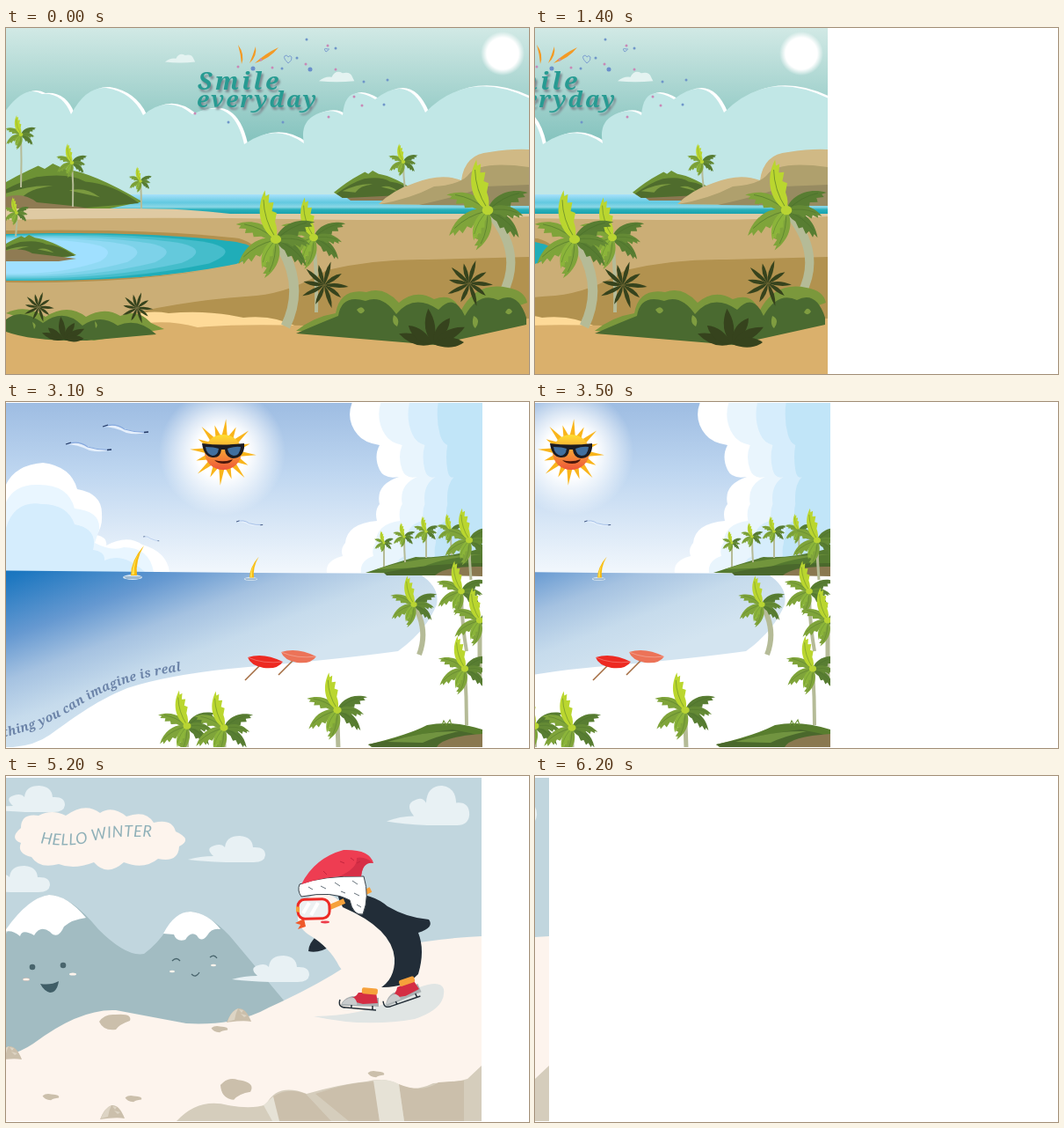
These frames come from a looping animation (595x393 px, 6300 ms). An HTML page:

```html
<!DOCTYPE html>
<html lang="en">
<head>
<meta charset="utf-8">
<title>Three postcards</title>
<style>
html, body { margin: 0; width: 100%; height: 100%; overflow: hidden; background: #fff; }
#stage { display: block; width: 595px; height: 393px; }
.script { font: italic 800 28px "Noto Serif", serif; }
.title { fill: #279b92; filter: drop-shadow(2px 3px 1px #7d8a90); }
</style>
</head>
<body>
<svg id="stage" viewBox="0 0 595 393"></svg>
<script>
const path = (fill, d, extra = '') => `<path fill="${fill}" d="${d}" ${extra}/>`;
const line = (color, width, d, extra = '') =>
  `<path fill="none" stroke="${color}" stroke-width="${width}" d="${d}" ${extra}/>`;
const place = (x, y, s, body, turn = 0) =>
  `<g transform="translate(${x} ${y}) rotate(${turn}) scale(${s})">${body}</g>`;
const ellipse = (fill, x, y, rx, ry = rx, extra = '') =>
  `<ellipse fill="${fill}" cx="${x}" cy="${y}" rx="${rx}" ry="${ry}" ${extra}/>`;
const rect = (fill, x, y, w, h, extra = '') =>
  `<rect fill="${fill}" x="${x}" y="${y}" width="${w}" height="${h}" ${extra}/>`;
const stops = list => list.map(([at, color, alpha = 1]) =>
  `<stop offset="${at}" stop-color="${color}" stop-opacity="${alpha}"/>`).join('');
const linear = (id, list, x2 = 0, y2 = 1) =>
  `<linearGradient id="${id}" x2="${x2}" y2="${y2}">${stops(list)}</linearGradient>`;
const radial = (id, list) => `<radialGradient id="${id}">${stops(list)}</radialGradient>`;

// Palms: drooping leaves around a crown, trunk from crown to foot
const leaf = (color, turn, flip, size) =>
  `<g transform="scale(${flip} 1) rotate(${turn}) scale(${size})">` +
  path(color, 'M0 0C9-11 32-14 50 3L44 2 45 6 37 3 36 8 28 4 25 8 17 4Q7 5 0 0') +
  line('#456b28', .8, 'M2 0Q22-6 41-1', 'opacity=".6"') + '</g>';
const crown = [
  ['#587d32', -27, 1, .95], ['#587d32', 38, 1, .9], ['#648a35', 6, 1, .78],
  ['#7fa43a', 103, 1, .9], ['#7fa43a', 30, -1, 1], ['#8bb43a', 62, -1, .72],
  ['#7fa43a', -24, -1, .95], ['#bad62f', -106, 1, 1.12]
].map(l => leaf(...l)).join('') + ellipse('#b8d432', 0, 0, 6, 5);
const palm = (x, y, s, dx, dy, bend = 0, width = 2) =>
  line('#b5bb97', width, `M${x} ${y}q${bend} ${dy / 2} ${dx} ${dy}`) + place(x, y, s, crown);

const fan = (x, y, s, angles, width) => place(x, y, s, angles.map((a, i) =>
  path('#36431d', `M0 0Q14-${width} ${i % 2 ? 25 : 29} 2Q14 ${width} 0 0`, `transform="rotate(${a})"`)).join(''));
const burst = [0, 32, 68, 110, 150, 185, 218, 250, 282, 322];
const agave = [-167, -148, -102, -62, -32, -8];

const island = (x, y, w, h) => `<g transform="translate(${x} ${y}) scale(${w} ${h})">` +
  path('#6d9235', 'M0 .8Q.15.4.3.15L.36.05.4.12.45 0 .52.12Q.7.2 1 .85L.8 1H.1Z') +
  path('#4f6c2d', 'M.03.85Q.2.45.35.3Q.55.2.65.4Q.82.45.98.88L.6 1H.1Z') +
  path('#7b9a3f', 'M.1.75Q.3.45.45.5Q.3.55.25.8ZM.55.6Q.65.5.74.75Z') + '</g>';

function tropics() {
  const cloud = 'M0 98Q24 62 45 74Q68 72 78 97Q95 65 118 67Q148 72 160 98Q188 74 216 97Q262 74 275 131Q310 106 343 130Q338 106 357 97Q375 89 387 98Q390 60 424 80Q462 50 481 95Q530 45 600 79V195H0Z';
  const puff = 'M0 10Q6 5 13 6Q17-2 24 2Q32 0 34 6L36 10Q18 12 0 10Z';
  const lagoon = 'M0-24C90-27 200-24 262-15Q304-6 262 10Q150 32 0 30Z';
  const water = ['#20adb8', '#45bdcb', '#64c9dc', '#7dd2e9', '#91daf4', '#a0e0ff'];
  const dots = (color, width, spots) => line(color, width,
    spots.map(([x, y]) => `M${x} ${y}h.01`).join(''), 'stroke-linecap="round"');
  return rect('url(#teal)', 0, 0, 595, 200) +
    ellipse('url(#moon)', 565, 29, 25) +
    place(181, 29, .95, path('#e4f3f1', puff)) +
    place(356, 49, 1.12, path('#e4f3f1', puff)) +
    path('#fff', cloud) + path('#c1e7e6', cloud, 'transform="translate(-4 1)"') +
    rect('#c1e7e6', 590, 82, 5, 110) + rect('url(#shore)', 0, 189, 595, 23) +
    // islands and rocks on the horizon
    island(-30, 154, 185, 51) +
    path('#8f7b53', 'M0 192Q20 186 35 198L75 202 128 210H0Z') +
    island(373, 162, 98, 31) + path('#8a7750', 'M388 193L448 190 460 196H392Z') +
    palm(452, 152, .38, 2, 32) +
    path('#d0b985', 'M424 200Q440 184 465 176Q495 164 518 173Q522 143 550 141Q575 137 595 138V202Z') +
    path('#afa06d', 'M425 200Q460 194 487 180Q515 178 525 168Q537 150 595 158V202Z') +
    path('#978b61', 'M470 201Q520 190 545 180L595 178V202Z') +
    // sand and lagoon
    path('#dfcaa3', 'M0 205L128 205Q200 204 255 211H595V230H0Z') +
    path('#cbae76', 'M0 218Q150 214 320 217T595 214V393H0Z') +
    path('#b2914f', 'M0 230Q160 227 265 239Q285 245 280 252L0 240Z') +
    water.map((c, i) => {
      const k = 1 - i * .118;
      return path(c, lagoon, `transform="translate(0 258) scale(${k} ${.5 + k / 2})"`);
    }).join('') +
    path('#b2914f', 'M0 289Q150 291 262 269Q170 288 0 287Z') +
    path('#b2924f', 'M100 336Q180 311 285 304Q325 300 365 275Q420 262 480 263L595 260V350H100Z') +
    path('#feda98', 'M118 338Q150 318 185 324Q230 320 270 329Q305 325 335 341L200 345Z') +
    path('#dab06c', 'M0 338Q90 345 160 335Q190 332 218 340Q260 336 340 338L595 330V393H0Z') +
    island(-18, 235, 98, 27) + path('#8f7b53', 'M0 253Q18 249 30 256L80 262 60 265H0Z') +
    palm(17, 121, .4, 0, 60, 1) + palm(75, 153, .4, 1, 50, 2) +
    palm(153, 174, .3, 1, 31, 1) + palm(12, 210, .33, -1, 27, 1) +
    // foreground plants
    palm(350, 238, .83, 3, 85, 4, 4) + palm(307, 240, 1.02, 11, 99, 35, 11) +
    palm(548, 207, 1.05, 17, 95, 42, 10) +
    path('#7b983c', 'M0 324Q22 313 45 328Q70 312 91 328Q112 316 130 327Q150 318 165 335L180 342 100 355Z') +
    path('#4a6a30', 'M0 331Q17 317 42 335Q66 317 87 338Q107 324 127 338Q150 328 171 348L92 355Q30 356 0 345Z') +
    path('#7b983c', 'M330 344Q350 328 375 324Q380 295 410 300Q430 293 447 312Q466 296 487 308Q510 300 517 322Q535 287 571 295Q590 298 593 312L480 352Z') +
    path('#4a6a30', 'M330 347Q360 334 378 327Q382 302 409 310Q428 302 444 325Q464 301 492 320Q510 300 522 327Q538 299 560 309Q582 298 592 329V337L488 360Z') +
    path('#7f9d40', 'M399 320q6-6 9 1q-4 7-9-1M441 326q8 4 4 13q-7-3-4-13M532 327q9 4 2 14q-5-4-2-14M568 323q4-8 8-1q-3 6-8 1M30 334q6 3 2 8zM101 333q5 4 1 8z') +
    fan(66, 354, .9, agave, 8) + fan(486, 359, 1.4, agave, 8) +
    fan(362, 292, .95, burst, 5) + fan(527, 290, .93, burst, 5) +
    fan(37, 317, .61, burst, 5) + fan(149, 318, .63, burst, 5) +
    // greeting
    path('#f39a25', 'M264 19Q272 30 268 41Q267 29 264 19M284 21Q286 32 277 40Q281 31 284 21M310 22Q300 35 283 40Q295 29 310 22') +
    line('#7d9fd0', 1, 'M321 40q-8-8-2-9q2 1 2 2q2-3 4 0q1 4-4 7M364 27q-4-5 2-3q4-1-2 3') +
    dots('#6f96c9', 3, [[342, 13], [331, 34], [375, 23], [407, 61], [434, 59], [253, 107], [315, 107], [314, 46], [430, 87]]) +
    dots('#6a8fcb', 5, [[346, 47], [281, 46]]) +
    dots('#c889b6', 3, [[366, 20], [341, 41], [375, 47], [396, 78], [405, 88], [367, 101], [215, 97], [290, 36], [264, 44], [303, 45]]) +
    '<g class="script title"><text x="218" y="70" letter-spacing="3.4">Smile</text>' +
    '<text x="217" y="90" letter-spacing="2" style="font-size:26px">everyday</text></g>';
}

function seaside() {
  const gull = path('#e6f0fc', 'M0 0Q10-5 24 2Q38 7 52 6Q40 10 27 7Q13 0 0 0') +
    line('#86a9de', 1.1, 'M1 0Q14-5 25 3Q38 7 52 6') +
    line('#263b65', 1.3, 'M0 0l6-2M47 6.5l5-.5');
  const boat = ellipse('#d8e7f3', -5, 17, 11, 3) + path('#9db9d0', 'M-15 16H6L2 19H-12Z') +
    path('#f7ba10', 'M8-19Q-7-2-7 15H0Q-2-2 8-19') + path('#ffe04a', 'M5-14Q-5-1-6 14H-3Q-4-2 5-14');
  const parasol = color => line('#a46d42', 1.6, 'M4-2L-21 23') +
    path(color, 'M-18-3Q0-9 22 2Q16 11 0 9Q-15 6-18-3') + line('#fff', .7, 'M-18-3Q0 5 22 2', 'opacity=".4"');
  const rays = Array.from({ length: 16 }, (_, i) =>
    path('#f9b51c', `M-3-19L0-${i % 2 ? 32 : 38} 3-19Z`, `transform="rotate(${i * 22.5 + 5})"`)).join('');
  const sun = rays + ellipse('url(#face)', 0, 0, 21, 20) +
    path('#1c1c22', 'M-24-10Q0-7 24-10V-5Q22 7 11 7Q3 6 2-3H-2Q-3 7-12 6Q-22 5-24-10') +
    path('#416f9f', 'M-20-6Q-10-6-5-4Q-6 4-12 4Q-19 2-20-6M5-4Q13-7 20-6Q19 4 12 4Q6 3 5-4') +
    path('#4b170b', 'M-10 9Q1 12 11 8Q9 13 1 13Q-6 13-10 9');
  const bank = 'M446 0Q438 20 452 37Q459 46 477 49Q470 62 477 77Q482 88 499 85Q472 94 477 116Q471 123 474 135Q440 138 438 160Q432 167 435 175Q415 180 417 194H594V0Z';
  return rect('url(#azure)', 0, 0, 595, 200) +
    ellipse('url(#glow)', 298, 57, 72) +
    path('#fff', 'M0 149Q10 143 23 148Q15 122 27 108Q38 104 48 106Q55 72 94 69Q126 73 133 99Q162 104 161 128Q162 141 155 151Q168 154 166 163Q190 150 207 162Q235 170 238 193H0Z') +
    path('#e9f6ff', 'M0 160Q12 156 22 160Q17 140 27 132Q36 122 48 126Q55 92 90 94Q123 94 130 121Q160 124 158 145L153 160Q172 170 186 165Q215 165 220 193H0Z') +
    path('#d5edfd', 'M22 193Q18 160 34 151Q40 139 52 143Q62 111 93 116Q122 116 130 139Q157 144 151 168Q165 170 164 180Q185 170 210 193Z') +
    ['#fff', '#e9f5fd', '#d6edfc', '#c1e5f8'].map((c, i) =>
      path(c, bank, `transform="translate(594 0) scale(${1 - i * .22} 1) translate(-594 0)"`)).join('') +
    place(120, 48, 1, gull) + place(162, 28, 1, gull) +
    place(314, 136, .58, gull) + place(208, 153, .36, gull, 8) +
    place(299, 57, 1, sun) +
    rect('#fff', 0, 195, 595, 198) +
    path('url(#ocean)', 'M0 191L330 194 522 195Q546 210 542 230Q530 260 498 283Q440 291 350 299Q245 307 190 325C152 340 122 364 102 378Q85 390 60 392H0Z') +
    place(201, 182, 1, boat) + place(334, 189, .7, boat) +
    place(345, 293, 1, parasol('#ed2a22')) + place(383, 287, 1, parasol('#ec7358')) +
    path('#557a30', 'M461 194Q490 184 518 176Q550 178 594 166V196Z') +
    path('#72953c', 'M474 190Q515 176 594 173Q545 178 525 188Z') +
    path('#4a682c', 'M482 194Q530 183 594 183V197H485Z') + path('#8a7850', 'M540 197Q552 186 594 187V198Z') +
    palm(482, 160, .25, 0, 27) + palm(505, 153, .29, 1, 29) +
    palm(530, 147, .32, 0, 30) + palm(558, 146, .35, 1, 28) +
    palm(579, 157, .66, 2, 45, 0, 3) + palm(516, 230, .6, 6, 57, 17, 6) +
    palm(570, 215, .63, 6, 68, 0, 4) + palm(591, 248, .68, 0, 65, 0, 5) +
    palm(574, 303, .68, 2, 64, 2, 4) +
    path('#587d2e', 'M464 389Q510 378 531 367Q560 361 594 372V392H468Z') +
    path('#4a682c', 'M464 389Q520 377 560 372Q578 375 594 380V392H470Z') +
    path('#719440', 'M486 386Q530 373 567 374Q540 380 526 387Z') +
    path('#8a7850', 'M542 392Q548 380 594 377V392Z') +
    line('#6b9237', 1.2, 'M548 367l2-5 3 5 4-6 2 6') +
    palm(258, 368, .74, 0, 25, 0, 4) + palm(300, 370, .76, 0, 24, 0, 5) + palm(429, 350, .78, 1, 43, 0, 5) +
    '<path id="coast" fill="none" d="M8 389C60 380 95 370 130 348S195 312 275 302"/>' +
    '<text class="script" style="font-size:14px;letter-spacing:.35px" fill="#6b83a8"><textPath href="#coast">Everything you can imagine is real</textPath></text>';
}

function winter() {
  const cloud = path('#e8f1f4', 'M0 27Q14 23 29 23Q19 14 30 11Q38 8 42 13Q43 0 59 0Q73 1 74 13Q88 12 88 22Q87 30 75 30H43Q17 29 0 27');
  const mound = path('#cbbfab', 'M-14 8Q-9-5-1-8Q8-9 14 7Q5 5-14 8') +
    path('#ddd4c4', 'M-13 7Q-9-5-1-8Q-4-2-5 5ZM0-7l3 4 2-3zM2-2l4 4 3-2z');
  const stone = path('#cbbfab', 'M-18-1Q-12-10 0-9Q20-11 17-2Q5 2 1 8Q-13 10-18-1');
  const boot = path('#a9b0b2', 'M-23 6Q-20-2-10-4L20-2V8L-21 7Z') +
    path('#d42d43', 'M-17 0Q-6-2-3-8H17L19 4 2 5Z') +
    rect('#f6a13b', 0, -14, 18, 7, 'rx="2" transform="rotate(5)"') +
    path('#c9cccd', 'M-22 5Q-17-3-8-2Q-4 2-5 6Z') +
    line('#253039', 1.5, 'M-24 0Q-27 9-17 9L17 12M-11 6v4M13 7v5');
  const penguin =
    path('#e0e5e4', 'M403 273Q463 272 497 252Q546 226 551 242Q554 264 518 276Q462 286 403 273') +
    path('#222d38', 'M408 180Q397 190 397 199Q409 202 425 192Z') +
    path('#222d38', 'M430 134Q466 130 487 148Q509 161 534 163Q541 172 522 178Q530 198 522 225Q507 241 479 240L440 165Z') +
    path('#fdf4ed', 'M385 158C390 126 431 129 436 149Q492 173 495 207Q496 231 477 242Q450 244 432 216Q421 194 397 180Q384 171 385 158') +
    path('#ef5a2b', 'M392 162L382 167 388 169 385 174 394 171Z') + ellipse('#ee3d4b', 416, 166, 5, 1.4) +
    line('#f6a13b', 6, 'M419 150L438 142M460 133L468 129') +
    path('#fff', 'M387 123Q413 113 460 114Q467 137 459 157Q448 159 444 141Q425 130 389 137Q384 130 387 123', 'stroke="#39424a"') +
    line('#66717a', 1, 'M397 126l5 3M411 125l6 3M427 121l6 4M447 119l6 4M449 133l6 3M452 146l5 3M434 131l5 2') +
    path('#ee3d52', 'M389 123Q404 93 437 84Q467 83 471 99Q459 95 457 114Q420 112 389 123') +
    path('#d62f47', 'M432 114Q453 105 452 93Q461 91 471 99Q459 97 457 114Z') +
    line('#c5263e', 1, 'M414 108l4 4M433 97l5 2M445 93l4 3M452 99l4-2') +
    rect('#edf1f2', 385, 140, 36, 22, 'rx="8" stroke="#ed2b25" stroke-width="3" transform="rotate(-2 403 151)"') +
    line('#fff', 4, 'M391 156l7-12M400 158l8-14') + path('#f6a13b', 'M383 148l4 1v6l-4-1z') +
    place(457, 254, 1, boot) + place(504, 246, 1, boot, -24);
  return rect('#c1d6de', 0, 0, 595, 393) +
    [[32, 11], [260, 68], [15, 102]].map(([x, y]) => place(x, y, 1, cloud)).join('') +
    place(486, 11, '1.07 1.5', cloud) +
    path('#fdf4ed', 'M70 59Q70 42 90 45Q105 37 121 45Q143 29 160 42Q174 33 190 46Q212 38 221 53Q242 48 246 63Q266 72 250 80Q249 99 226 94Q210 107 187 98Q168 115 153 98Q130 107 113 100Q91 106 82 92Q65 88 70 76Q56 71 70 59') +
    '<path id="wave" fill="none" d="M92 76Q125 82 152 74T240 70"/>' +
    '<text style="font:italic 18px Lato,sans-serif;letter-spacing:.6px" fill="#8fb0b8"><textPath href="#wave">HELLO WINTER</textPath></text>' +
    path('#a2bcc2', 'M0 325Q28 220 55 176Q78 138 102 135Q126 135 158 174Q190 206 210 202Q226 190 236 174Q249 154 264 154Q283 156 307 181L375 262V330Z') +
    path('#fff', 'M51 177Q78 138 102 135Q122 135 144 161Q128 163 119 171Q112 187 103 177Q92 169 85 181Q71 173 69 182Q60 174 51 177M232 179Q245 154 263 154Q283 156 297 174Q287 172 282 181Q275 190 270 181Q263 176 257 186Q247 189 244 180Z') +
    ellipse('#49656d', 83, 217, 3.3) + ellipse('#49656d', 118, 215, 3.3) +
    path('#405e67', 'M92 236Q104 238 113 233Q111 246 103 246Q96 244 92 236') +
    ellipse('#fff4ec', 76, 231, 4, 1.6, 'stroke="#c8aaa0" stroke-width=".4"') + ellipse('#fff4ec', 129, 225, 4, 1.6) +
    line('#49656d', 1.3, 'M242 210q5-5 9 0M285 206q5-4 8 1M264 225q5 5 9-2') +
    ellipse('#fff4ec', 242, 222, 3, 1.3) + ellipse('#fff4ec', 289, 215, 3, 1.3) +
    place(310, 204, 1, cloud) +
    path('#fdf4ed', 'M0 323Q53 325 84 304Q137 264 178 266Q215 273 258 281Q315 284 352 263Q405 239 440 216Q480 188 594 182V393H0Z') +
    path('#d5cdbc', 'M247 392Q272 365 306 374Q333 379 349 373Q362 348 395 361Q433 350 463 347Q483 342 499 350Q516 360 539 349Q570 347 578 344L594 329V392Z') +
    path('#cbbfab', 'M357 364Q374 353 394 361L423 392H362ZM405 361Q440 348 472 347L478 392H443ZM500 350Q526 361 545 348L574 346V392H506Z') +
    path('#e6e2d6', 'M346 374L357 364 364 392H356ZM471 346Q487 343 500 350L506 392H478Z') +
    place(57, 315, 1, mound) + place(318, 272, 1, mound) + place(174, 382, 1, mound) +
    place(177, 280, 1, stone) + place(314, 357, '1 1.35', stone, 15) +
    [[104, 365], [198, 367], [296, 288], [474, 339]].map(([x, y]) => place(x, y, '.53 .4', stone, 8)).join('') +
    penguin;
}

const defs = '<defs>' +
  linear('teal', [[0, '#d1e9e5'], [.66, '#83c2bd']]) +
  linear('shore', [[0, '#a8e1fb'], [.4, '#62c9e0'], [.62, '#8bd7e6'], [.75, '#29b0bb'], [1, '#159fab']]) +
  linear('azure', [[0, '#9dbce2'], [.4, '#bed6f0'], [.95, '#f0f6fc']]) +
  linear('ocean', [[0, '#0e6fbb'], [.12, '#1d77c0'], [.4, '#6699d1'], [.6, '#a5c2e1'], [.8, '#c6dbec'], [1, '#d3e4f0']], .6, .6) +
  linear('face', [[0, '#ffdf32'], [.4, '#f9a935'], [1, '#ed5539']]) +
  radial('moon', [[.72, '#fff'], [1, '#fff', 0]]) +
  radial('glow', [[.4, '#fff'], [.65, '#fff', .6], [1, '#fff', 0]]) + '</defs>';

const scenes = [
  { draw: tropics, box: [0, 0, 595, 393], stride: 52.4 },
  { draw: seaside, box: [1, 1, 593, 391], stride: 51.6 },
  { draw: winter, box: [1, 2, 593, 390], stride: 52.55 }
];
const stage = document.getElementById('stage');
stage.innerHTML = defs + scenes.map(({ draw, box: [x, y, w, h] }) =>
  `<g class="scene"><svg x="${x}" y="${y}" width="${w}" height="${h}" viewBox="${x} ${y} ${w} ${h}">${draw()}</svg></g>`).join('');
const groups = stage.querySelectorAll('.scene');

// Each scene rests for a second, then leaves to the left in eleven steps
const SCENE = 2100, REST = 1000, STEP = 100;
const start = performance.now();
function render() {
  const t = (performance.now() - start) % (SCENE * scenes.length);
  const current = Math.floor(t / SCENE);
  const steps = Math.max(0, Math.floor((t % SCENE - REST) / STEP) + 1);
  groups.forEach((g, i) => {
    g.style.display = i === current ? '' : 'none';
    g.setAttribute('transform', `translate(${-Math.round(steps * scenes[i].stride)} 0)`);
  });
  requestAnimationFrame(render);
}
render();
</script>
</body>
</html>
```
